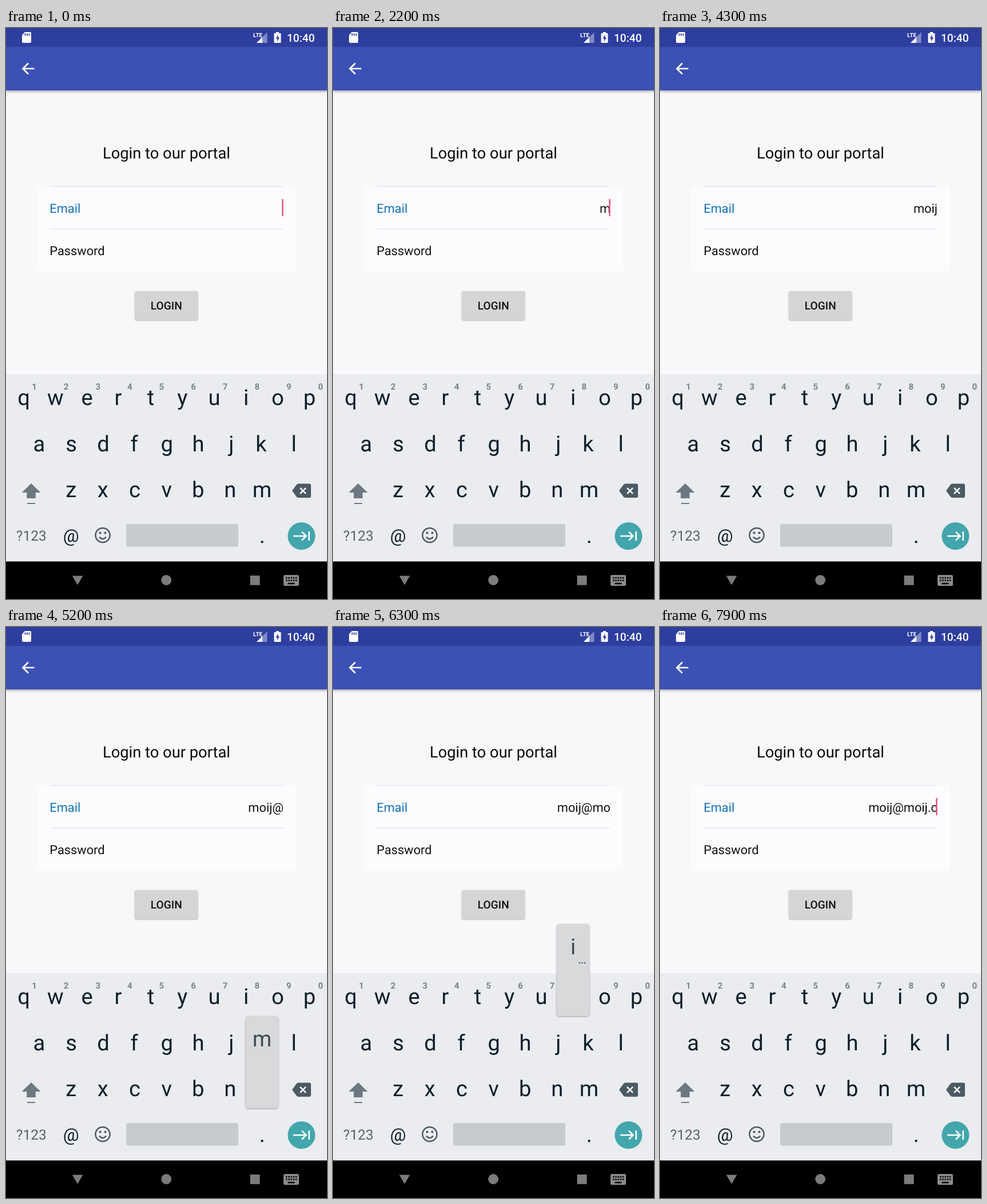
Write an HTML page that moves like this. It is 561x998 px and loops after 8000 ms.

```html
<!DOCTYPE html>
<html lang="en">
<head>
<meta charset="utf-8">
<title>Login form</title>
<style>
  html, body { margin: 0; width: 100%; height: 100%; overflow: hidden; background: #f9f7fa; }
  svg { display: block; width: 100%; height: 100%; }
  text { font-family: Roboto, "Open Sans", sans-serif; text-rendering: geometricPrecision; white-space: pre; }
  .mid { text-anchor: middle; }
  .end { text-anchor: end; }
  .body { font-size: 21.8px; fill: #111; }
  .key { fill: #0c1f2b; }
  .hint { font-size: 15px; font-weight: 700; fill: #77848b; }
  .raised { filter: drop-shadow(0 1.5px 1.5px rgba(0, 0, 0, .32)); }
  .bar { filter: drop-shadow(0 2px 2px rgba(0, 0, 0, .35)); }
  #pop { filter: drop-shadow(0 1.5px 1.5px rgba(0, 0, 0, .35)); }
  #pop .key { fill: #3c4b54; }
</style>
</head>
<body>
<svg viewBox="0 0 561 998">
  <rect width="561" height="998" fill="#f9f7fa"/>
  <rect class="bar" width="561" height="109" fill="#3b51b5"/>
  <rect width="561" height="33" fill="#2e3e9f"/>

  <!-- status bar -->
  <path d="M33 7H42Q44 7 44 9V24Q44 26 42 26H30Q28 26 28 24V12.5Z" fill="#fff"/>
  <path d="M33.5 9.5v4M37 9.5v4M40.5 9.5v4" stroke="#2e3e9f" stroke-width="1.8"/>
  <path d="M456.5 7.5V26H438Z" fill="#7f8ac6"/>
  <path d="M448 16V26H438Z" fill="#fff"/>
  <text x="432" y="15.5" font-size="10" font-weight="700" fill="#fff">LTE</text>
  <path d="M472 9V7h5v2h2.5q1 0 1 1V25q0 1-1 1h-10q-1 0-1-1V10q0-1 1-1Z" fill="#fff"/>
  <path d="M475.5 11.5L471.5 18.5H474V23.5L478 16.5H475.5Z" fill="#2e3e9f"/>
  <text class="end" x="539.5" y="23.5" font-size="19.1" font-weight="500" fill="#fff">10:40</text>
  <path d="M49.5 71H30M39 61.5L29.5 71L39 80.5" fill="none" stroke="#fff" stroke-width="2.7"/>

  <!-- form -->
  <text class="mid" x="280.5" y="228" font-size="27.3" fill="#0b0b0b">Login to our portal</text>
  <rect x="54" y="277" width="453" height="148" fill="#fdfbfe"/>
  <path d="M77 277.3H484M77 351.3H484" stroke="#e4e2e6" stroke-width="1.3"/>
  <text class="body" x="76.3" y="323" style="fill:#1272b8">Email</text>
  <text class="body" x="76.3" y="397">Password</text>
  <text class="body end" id="typed" x="485" y="323"></text>
  <rect id="caret" x="482.2" y="299" width="2.5" height="30" fill="#e2527f"/>
  <rect class="raised" x="225.5" y="460" width="109.5" height="50" rx="2.5" fill="#d6d4d7"/>
  <text class="mid" x="280.3" y="492.3" font-size="19.1" font-weight="500" fill="#111">LOGIN</text>

  <!-- keyboard -->
  <rect y="605" width="561" height="328" fill="#eaecef"/>
  <g id="keys"></g>
  <path d="M44 796L60.5 812H51.7V822H36.3V812H27.5Z" fill="#6c7981"/>
  <path d="M37 831H51" stroke="#6c7981" stroke-width="2"/>
  <path d="M500 808.8L507.5 798.5Q509 796.5 511 796.5H530Q533 796.5 533 799.5V818Q533 821 530 821H511Q509 821 507.5 819Z" fill="#4b5a63"/>
  <path d="M514 803.8l10 10m0-10l-10 10" stroke="#fff" stroke-width="2.6"/>
  <text class="mid" x="44.3" y="896" font-size="24.5" fill="#56646c">?123</text>
  <g fill="none" stroke="#4b5a63" stroke-width="2.5">
    <circle cx="169" cy="886.5" r="12.6"/>
    <path d="M163 889.5Q169 896.5 175 889.5"/>
    <path d="M164.5 882.5h.01M173.5 882.5h.01" stroke-width="4.2" stroke-linecap="round"/>
  </g>
  <rect x="210" y="867" width="196" height="39.5" rx="3.5" fill="#c7cace"/>
  <circle cx="516.4" cy="888" r="24" fill="#42a6ac"/>
  <path d="M502 888H524M517 880.5L524.5 888L517 895.5M529.7 880V896" fill="none" stroke="#fff" stroke-width="2.6"/>
  <g id="pop">
    <rect x="-28.5" width="57" height="161" rx="5.5" fill="#d7d9db"/>
    <path d="M10.4 68h2.2m2.4 0h2.2m2.4 0h2.2" stroke="#3c4b54" stroke-width="2.2"/>
  </g>

  <!-- navigation bar -->
  <rect y="932.4" width="561" height="66" fill="#000"/>
  <g fill="#7c7c7c">
    <path d="M115.8 957.5H134.4L125.1 973.5Z"/>
    <circle cx="280.2" cy="965" r="8.9"/>
    <rect x="426.6" y="957" width="17" height="16.7"/>
    <rect x="485" y="956" width="27" height="19" rx="2.5" fill="#8c8c8c"/>
  </g>
  <path d="M489 961H509M489 965.5H509" stroke="#000" stroke-width="2.5" stroke-dasharray="2.6 1.6"/>
  <path d="M492.5 971H504.5" stroke="#000" stroke-width="2.5"/>
</svg>
<script>
const ADDRESS = 'moij@moij.c', LOOP = 8000, STEP = 100;
const MIDDLE = 280.5, PITCH = 55.6, ROW = 80.5, BASE = 659, POP_TOP = 519, POP_RISE = 87;
const $ = id => document.getElementById(id);
const pen = document.createElement('canvas').getContext('2d');
const keys = {};

function label(str, x, y, cls, parent = $('keys')) {
  const el = document.createElementNS('http://www.w3.org/2000/svg', 'text');
  el.setAttribute('class', cls + ' mid');
  el.setAttribute('x', x);
  el.setAttribute('y', y);
  el.textContent = str;
  parent.append(el);
  return el;
}

// key letters are centred on their ink, not on their advance width
function drawKey(ch, x, y, size, parent) {
  pen.font = `${size}px Roboto, "Open Sans", sans-serif`;
  pen.textAlign = 'center';
  const ink = pen.measureText(ch);
  const shift = (ink.actualBoundingBoxLeft - ink.actualBoundingBoxRight) / 2;
  label(ch, x + shift, y, 'key', parent).setAttribute('font-size', size);
}

// col counts key widths from the middle of the keyboard
function addKey(ch, col, row, size = 38.2) {
  const x = MIDDLE + col * PITCH, y = BASE + row * ROW;
  keys[ch] = { x, top: POP_TOP + row * ROW, size };
  drawKey(ch, x, y, size);
}

['qwertyuiop', 'asdfghjkl', 'zxcvbnm'].forEach((letters, row) =>
  [...letters].forEach((ch, i) => addKey(ch, i - (letters.length - 1) / 2, row)));
addKey('@', -3, 2.97, 31);
addKey('.', 3, 2.99);
[...'qwertyuiop'].forEach((ch, i) => label((i + 1) % 10, keys[ch].x + 19.2, 631.5, 'hint'));

// one popup layer per character that gets typed
const [, dots] = $('pop').children;
const popups = {};
for (const ch of new Set(ADDRESS)) {
  const layer = $('pop').appendChild(dots.cloneNode());
  const group = document.createElementNS(layer.namespaceURI, 'g');
  layer.replaceWith(group);
  drawKey(ch, 0, BASE - POP_RISE - POP_TOP, keys[ch].size, group);
  popups[ch] = group;
}

// when each character is pressed; it is typed, then its popup closes, after a fixed delay
const presses = [1950, 2450, 3220, 3620, 4500, 5100, 5650, 6250, 6650, 7220, 7650];
const TYPE_DELAY = 120, CLOSE_DELAY = 170, BLINK = 500;

function draw(t) {
  const count = presses.filter(p => p + TYPE_DELAY <= t).length;
  const typedAt = count ? presses[count - 1] + TYPE_DELAY : 0;
  $('typed').textContent = ADDRESS.slice(0, count);
  $('caret').style.display = Math.floor((t - typedAt) / BLINK) % 2 ? 'none' : '';

  const down = ADDRESS[presses.findIndex(p => p <= t && t < p + CLOSE_DELAY)];
  $('pop').style.display = down ? '' : 'none';
  if (!down) return;
  const { x, top } = keys[down];
  $('pop').setAttribute('transform', `translate(${x} ${top})`);
  for (const ch in popups) popups[ch].style.display = ch === down ? '' : 'none';
  dots.style.display = 'eyuioascn'.includes(down) ? '' : 'none';
}

const start = performance.now();
function tick() {
  const t = (performance.now() - start) % LOOP;
  draw(Math.floor(t / STEP) * STEP);
  requestAnimationFrame(tick);
}
tick();
</script>
</body>
</html>
```
